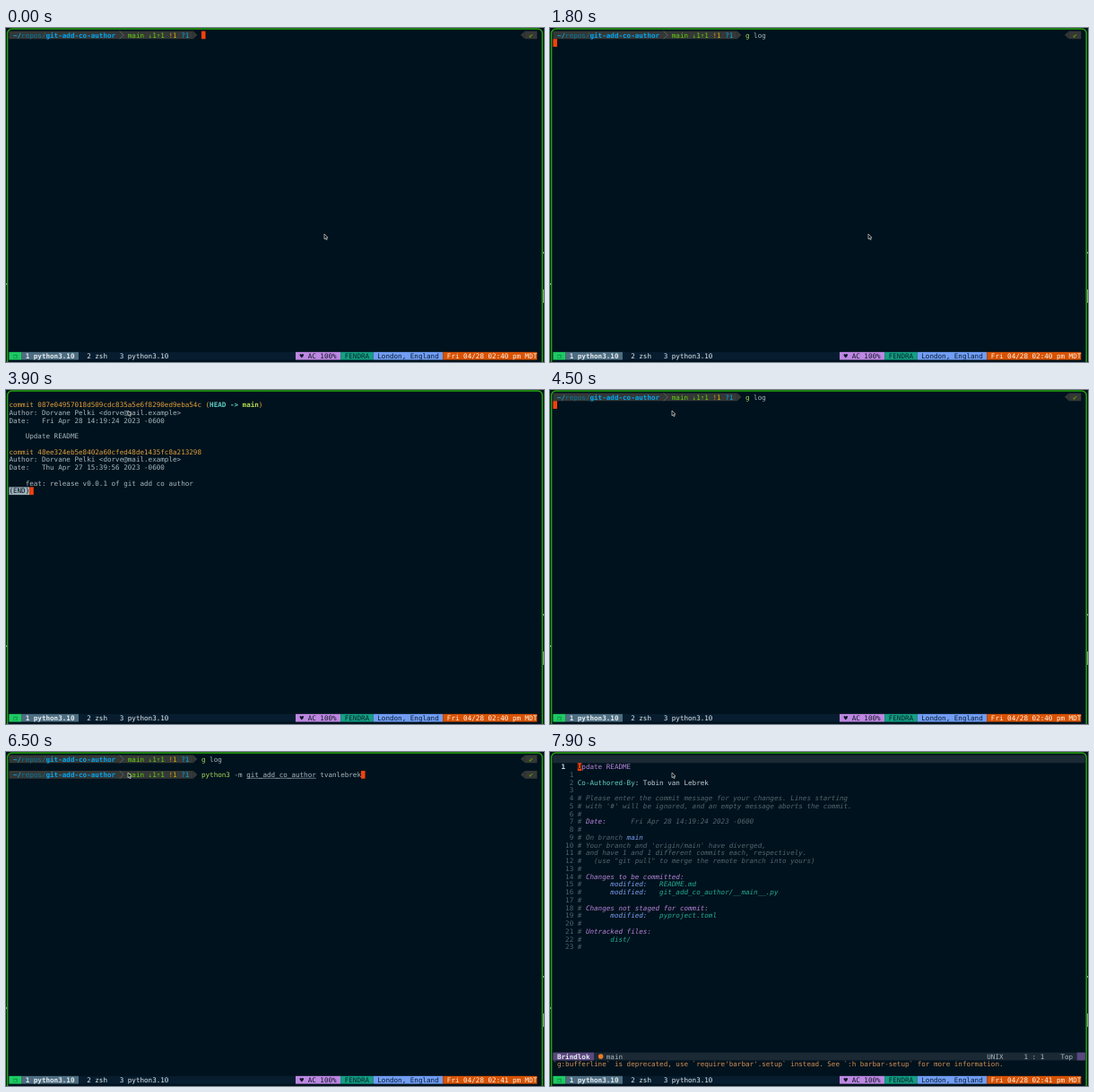
Animation, 600 px wide and 373 px high, one loop 8 s. Source, as an HTML page with a canvas:

```html
<!DOCTYPE html>
<html lang="en">
<head>
<meta charset="utf-8">
<title>Terminal session</title>
<style>
  html, body { margin: 0; width: 100%; height: 100%; overflow: hidden; background: #00121d; }
  canvas { display: block; width: 600px; height: 373px; }
</style>
</head>
<body>
<canvas id="stage"></canvas>
<script>
const W = 600, H = 373, LOOP = 8000, STEP = 100;
const CELL_W = 4.565, CELL_H = 8.74, LEFT = 3.4, TOP = 3.5, FONT_SIZE = 7.58;
const C = {
  bg: '#00121d', text: '#a9b8c0', dim: '#53656d', white: '#e4ecf0', cursor: '#f5400c',
  prompt: '#343836', blue: '#00a4f0', blueDim: '#08759b', green: '#63cf0d', yellow: '#d2a50e',
  command: '#a8d85a', orange: '#e4a03c', teal: '#62cfc6', purple: '#b583d8', periwinkle: '#7c9df2',
  file: '#22ab91', bar: '#1b2935', mode: '#5b477f'
};

const canvas = document.getElementById('stage');
const ctx = canvas.getContext('2d');
const dpr = window.devicePixelRatio || 1;
canvas.width = W * dpr;
canvas.height = H * dpr;

const colX = col => LEFT + col * CELL_W;
const rowY = row => TOP + row * CELL_H;

function fillCells(row, col, count, color) {
  ctx.fillStyle = color;
  ctx.fillRect(colX(col), rowY(row), count * CELL_W, CELL_H);
}

// Style letters: b bold, i italic, u underline.
function put(row, col, text, color = C.text, style = '') {
  const italic = style.includes('i') ? 'italic ' : '';
  const bold = style.includes('b') ? 'bold ' : '';
  ctx.font = `${italic}${bold}${FONT_SIZE}px "DejaVu Sans Mono", "DejaVu Sans", monospace`;
  ctx.fillStyle = color;
  const chars = [...text];
  chars.forEach((ch, i) => {
    if (ch !== ' ') ctx.fillText(ch, colX(col + i), rowY(row) + 7);
  });
  if (style.includes('u')) ctx.fillRect(colX(col), rowY(row) + 7.9, chars.length * CELL_W, 0.6);
  return col + chars.length;
}

function putRuns(row, col, runs) {
  for (const [text, color, style] of runs) col = put(row, col, text, color, style);
}

function poly(points, fill) {
  ctx.beginPath();
  points.forEach(([x, y]) => ctx.lineTo(x, y));
  ctx.closePath();
  ctx.fillStyle = fill;
  ctx.fill();
}

const cursor = (row, col) => fillCells(row, col, 1, C.cursor);

function prompt(row) {
  const top = rowY(row), mid = top + CELL_H / 2, bottom = top + CELL_H;
  fillCells(row, 0, 45, C.prompt);
  poly([[colX(45), top], [colX(46), mid], [colX(45), bottom]], C.prompt);
  fillCells(row, 126, 3, C.prompt);
  poly([[colX(126), top], [colX(125), mid], [colX(126), bottom]], C.prompt);
  putRuns(row, 1, [['~/', C.blue, 'b'], ['repos/', C.blueDim], ['git-add-co-author', C.blue, 'b']]);
  ctx.beginPath();
  ctx.moveTo(colX(27), top);
  ctx.lineTo(colX(28), mid);
  ctx.lineTo(colX(27), bottom);
  ctx.strokeStyle = '#747b78';
  ctx.lineWidth = 0.6;
  ctx.stroke();
  putRuns(row, 29, [['main ⇣1⇡1 ', C.green], ['!1 ', C.yellow], ['?1', C.blue]]);
  put(row, 127, '✔', '#679709');
}

// Colours the visible part of a command.
function typed(row, runs, count) {
  let col = 47, left = count;
  for (const [text, color, style] of runs) {
    if (left <= 0) break;
    col = put(row, col, text.slice(0, left), color, style);
    left -= text.length;
  }
  return col;
}

const LOG_COMMAND = [['g', C.command], [' log', C.text]];
const ADD_COMMAND = [
  ['python3', C.command], [' -m ', C.text], ['git_add_co_author', C.text, 'u'], [' tvanlebrek', C.text]
];

function commit(row, hash, date, message, refs = []) {
  putRuns(row, 0, [['commit ' + hash, C.orange], ...refs]);
  put(row + 1, 0, 'Author: Dorvane Pelki <dorve@mail.example>');
  put(row + 2, 0, 'Date:   ' + date + ' 2023 -0600');
  put(row + 4, 4, message);
}

function pager() {
  commit(1, '087e04957018d509cdc835a5e6f8290ed9eba54c', 'Fri Apr 28 14:19:24', 'Update README', [
    [' (', C.orange], ['HEAD -> ', C.teal, 'b'], ['main', '#b5dd55', 'b'], [')', C.orange]
  ]);
  commit(7, '48ee324eb5e8402a60cfed48de1435fc8a213298', 'Thu Apr 27 15:39:56',
    'feat: release v0.0.1 of git add co author');
  fillCells(12, 0, 5, '#9db0ba');
  put(12, 0, '(END)', C.bg);
  cursor(12, 5);
}

const note = text => [['# ' + text, C.dim, 'i']];
const heading = text => [['# ', C.dim, 'i'], [text, C.purple, 'i']];
const modified = name => [
  ['#       ', C.dim, 'i'], ['modified:   ', C.periwinkle, 'i'], [name, C.file, 'i']
];
const MESSAGE = [
  [['Update README', C.purple]],
  [],
  [['Co-Authored-By', C.teal], [': Tobin van Lebrek', '#c2d0d8']],
  [],
  note('Please enter the commit message for your changes. Lines starting'),
  note("with '#' will be ignored, and an empty message aborts the commit."),
  note(''),
  [['# ', C.dim, 'i'], ['Date:', C.purple, 'i'], ['      Fri Apr 28 14:19:24 2023 -0600', C.dim, 'i']],
  note(''),
  [['# On branch ', C.dim, 'i'], ['main', C.periwinkle, 'i']],
  note("Your branch and 'origin/main' have diverged,"),
  note('and have 1 and 1 different commits each, respectively.'),
  note('  (use "git pull" to merge the remote branch into yours)'),
  note(''),
  heading('Changes to be committed:'),
  modified('README.md'),
  modified('git_add_co_author/__main__.py'),
  note(''),
  heading('Changes not staged for commit:'),
  modified('pyproject.toml'),
  note(''),
  heading('Untracked files:'),
  [['#       ', C.dim, 'i'], ['dist/', C.file, 'i']],
  note('')
];

function editor() {
  fillCells(0, 0, 130, C.bar);
  MESSAGE.forEach((runs, i) => {
    if (i) put(i + 1, 3, String(i).padStart(2), '#4b6479');
    putRuns(i + 1, 6, runs);
  });
  put(1, 2, '1', '#c5e4fd', 'b');
  cursor(1, 6);
  put(1, 6, 'U', C.bg);

  fillCells(38, 0, 130, C.bar);
  fillCells(38, 0, 10, C.mode);
  put(38, 1, 'Brindlok', C.white, 'b');
  ctx.beginPath();
  ctx.arc(colX(11) + 3, rowY(38) + CELL_H / 2, 2.8, 0, Math.PI * 2);
  ctx.fillStyle = '#ee7923';
  ctx.fill();
  put(38, 13, 'main', C.text);
  put(38, 106, 'UNIX', C.text);
  put(38, 115, '1 : 1', C.text);
  put(38, 124, 'Top', C.text);
  fillCells(38, 128, 2, C.mode);
  put(39, 0, "`g:bufferline` is deprecated, use `require'barbar'.setup` instead. " +
    'See `:h barbar-setup` for more information.', '#d28e55');
}

function statusBar(clock) {
  const row = 41;
  const segments = [
    [0, 3, '#1ccb62', ' ❐', '#04502a'],
    [3, 14, '#4d6c80', ' 1 python3.10', C.white, 'b'],
    [17, 53, '#071d2f', '  2 zsh   3 python3.10', C.white],
    [70, 11, '#bd87e2', ' ♥ AC 100%', '#101827'],
    [81, 8, '#139f83', ' FENDRA', '#06222b'],
    [89, 17, '#719df3', ' London, England', '#081c35'],
    [106, 23, '#d75203', ` Fri 04/28 ${clock} pm MDT`, '#fff4e9']
  ];
  for (const [col, count, bg, text, fg, style] of segments) {
    fillCells(row, col, count, bg);
    put(row, col, text, fg, style);
  }
}

function frame() {
  ctx.strokeStyle = '#25a30d';
  ctx.lineWidth = 1.5;
  ctx.beginPath();
  ctx.roundRect(1.6, 1, 596.6, 400, 5);
  ctx.stroke();
  ctx.fillStyle = '#8d9894';
  ctx.fillRect(599, 250, 1, 2);
  ctx.fillRect(599, 292, 1, 15);
  ctx.fillRect(0, 285, 1, 2);
}

const MOUSE = [[0, 355, 230], [2700, 355, 230], [3000, 70, -5], [3500, 136, 23], [LOOP, 136, 23]];

function pointer(t) {
  const i = MOUSE.findIndex(([time]) => time > t);
  const [t0, x0, y0] = MOUSE[i - 1], [t1, x1, y1] = MOUSE[i];
  const p = (t - t0) / (t1 - t0), ease = p * p * (3 - 2 * p);
  const x = x0 + (x1 - x0) * ease, y = y0 + (y1 - y0) * ease;
  const arrow = [[0, 0], [0, 5.7], [1.3, 4.6], [2.2, 6.6], [3.2, 6.1], [2.3, 4.2], [4, 4.1]];
  poly(arrow.map(([dx, dy]) => [x + dx, y + dy]), '#05080b');
  ctx.strokeStyle = '#d5dcdf';
  ctx.lineWidth = 0.7;
  ctx.stroke();
}

const LOG_KEYS = [1000, 1200, 1300, 1400, 1600];
const lettersAt = t => t < 5000 ? 0 : t < 6300 ? Math.round((t - 4900) / 1300 * 37) : t < 6400 ? 37 : t < 6500 ? 38 : 39;

function shell(t) {
  prompt(0);
  const logEnd = typed(0, LOG_COMMAND, LOG_KEYS.filter(k => k <= t).length);
  if (t < 1800) return cursor(0, logEnd);
  if (t < 4600) return cursor(1, 0);
  prompt(2);
  const addEnd = typed(2, ADD_COMMAND, lettersAt(t));
  if (t < 7000) return cursor(2, addEnd);
  if (t < 7200) return cursor(3, 0);
  cursor(3, put(3, 0, 'hint: Waiting for your editor to close the file... '));
}

function draw(t) {
  ctx.setTransform(dpr, 0, 0, dpr, 0, 0);
  ctx.textRendering = 'geometricPrecision';
  ctx.fillStyle = C.bg;
  ctx.fillRect(0, 0, W, H);
  if (t >= 1900 && t < 4500) pager();
  else if (t >= 7800) editor();
  else shell(t);
  statusBar(t < 5000 ? '02:40' : '02:41');
  frame();
  pointer(t);
}

const start = performance.now();
function tick() {
  const elapsed = (performance.now() - start) % LOOP;
  draw(Math.floor(elapsed / STEP) * STEP);
  requestAnimationFrame(tick);
}
tick();
</script>
</body>
</html>
```
